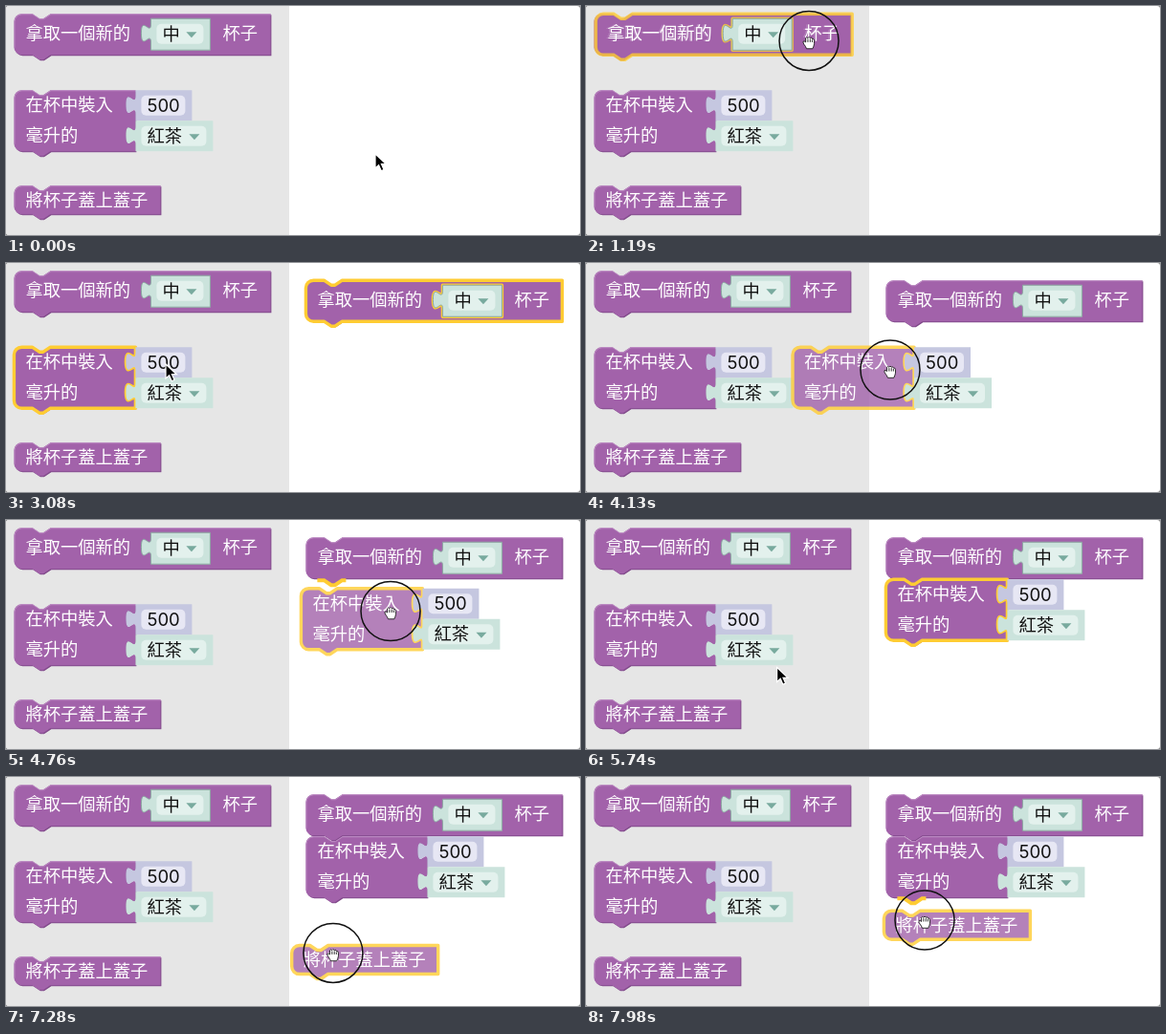
Animation, 600 px wide and 240 px high, one loop 8000 ms. Source, as an HTML page:

```html
<!DOCTYPE html>
<html lang="zh-Hant">
<head>
<meta charset="utf-8">
<style>
html, body { margin: 0; width: 100%; height: 100%; overflow: hidden; background: #888; }
svg { display: block; width: 600px; height: 240px; background: #fff; border-radius: 3px; }
text { font: 500 18.3px "Noto Sans CJK TC", "Noto Sans CJK", sans-serif; fill: #fff; }
.field text { fill: #111; }
.num text { font: 18.5px Inter, "Liberation Sans", sans-serif; }
.body { fill: #a262aa; }
.shade { fill: #80498a; }
.light { fill: none; stroke: #bd8cc3; }
.mint { fill: #cbe3dc; }
.mint rect { fill: #e3f1ed; }
.mint .arrow { fill: #78aa9e; }
.inline .socket { stroke: #8aa7a0; }
.num { fill: #c5c7e0; }
.num rect { fill: #e7e7f4; }
.sel .body { stroke: #fc3; stroke-width: 3.4; stroke-linejoin: round; }
.sel .light, .drag .shade { display: none; }
.drag .body { opacity: .8; }
.link { fill: none; stroke: #fc3; stroke-width: 4; }
</style>
</head>
<body>
<svg id="stage" viewBox="0 0 600 240"></svg>
<script>
const LOOP = 8000, LAG = 40;
const NOTCH = 'l7.5,5 h4 l7.5,-5', TAB_OUT = 'l-7.5,5 h-4 l-7.5,-5';
const SOCKET = 'v6 c0,12.5 -10,-10 -10,9.4 s10,-3.1 10,9.4';

const text = (x, y, s) => `<text x="${x}" y="${y}">${s}</text>`;

// Statement block: right is the path of the right side, hole an inner socket
function statement(top, bottom, right, hole, content) {
  const edge = `a8,8 0 0 1 8,-8 h11 ${NOTCH}`;
  const path = `M9,${top + 8} ${edge} ${right} V${bottom} H47 ${TAB_OUT} H17 a8,8 0 0 1 -8,-8 z ${hole}`;
  return `<path class="shade" fill-rule="evenodd" transform="translate(1 1)" d="${path}"/>
    <path class="body" fill-rule="evenodd" d="${path}"/>
    <path class="light" transform="translate(.5 .5)" d="M9,${bottom - 8} V${top + 8} ${edge} ${right.split(' ')[0]}"/>${content}`;
}

const valuePath = (x, y, right, h) => `M${x},${y} ${SOCKET} V${y + h} H${right} V${y} z`;

function value(cls, x, y, right, h, label) {
  const tip = right - 25;
  const arrow = cls == 'num' ? '' : `<path class="arrow" d="M${tip},${y + 14} h11 l-5.5,6 z"/>`;
  return `<g class="field ${cls}"><path class="socket" d="${valuePath(x, y, right, h)}"/>
    <rect x="${x + 6}" y="${y + 5.5}" width="${right - x - 13}" height="21" rx="5"/>
    ${text(x + 12, y + 22.5, label)}${arrow}</g>`;
}

const shapes = [
  statement(9, 52, 'H277', valuePath(152, 14, 214, 33),
    text(21, 36, '拿取一個新的') + value('mint inline', 152, 14, 214, 33, '中') + text(227, 36, '杯子')),
  statement(89, 153, `H136 ${SOCKET} V121 ${SOCKET}`, '',
    text(21, 111, '在杯中裝入') + text(21, 143, '毫升的') +
    value('num', 136, 89, 195, 32, '500') + value('mint', 136, 121, 217, 32, '紅茶')),
  statement(189, 219, 'H162', '', text(21, 210.5, '將杯子蓋上蓋子'))
];

const link = (id, y) => `<path id="${id}" class="link" d="M326,${y} h7 ${NOTCH} h4"/>`;
const group = prefix => shapes.map((s, i) => `<g id="${prefix}${i}">${s}</g>`).join('');

stage.innerHTML = `<rect width="296" height="240" fill="#e6e6e6"/>
  <g transform="translate(-.6 -.8)">${group('menu')}${group('copy')}${link('link0', 64)}${link('link1', 128)}</g>
  <path id="arrow" d="M0,0 v15 l3.6,-3.3 2.6,6 2.8,-1.2 -2.6,-5.8 h5 z" fill="#000" stroke="#fff" stroke-width="1.2"/>
  <g id="hand" fill="none" stroke="#111"><circle r="31" stroke-width="1.5"/>
    <g transform="translate(0 1.5) scale(.85)">
      <path d="M-3,8 C-4,4 -8,2 -7,-1 Q-6,-2 -4,0 V-5 Q-3,-7 -1.5,-5 Q0,-8 1.5,-5 Q3,-7 4,-4 Q6,-5 6.5,-2 V2 Q6,5 4.5,8 z" fill="#fff"/>
      <path d="M-1.3,-4 V0 M1.5,-4 V0 M4,-3 V0"/></g></g>`;

// Pointer strokes, each eased from wherever the last one ended
const home = [386, 155];
const strokes = [
  { from: 150, to: 850, end: [224, 36] },
  { from: 1120, to: 1780, end: [505, 50] },
  { from: 1850, to: 2200, end: [529, 46] },
  { from: 2400, to: 3000, end: [167, 106] },
  { from: 3150, to: 3450, end: [102, 112] },
  { from: 3680, to: 4150, end: [319, 112] },
  { from: 4200, to: 4720, end: [402, 95.5] },
  { from: 5300, to: 6100, end: [51, 198] },
  { from: 6490, to: 7080, end: [340, 190] },
  { from: 7080, to: 7940, end: [354, 150] }
];

// The pointer holds a block from press to drop; selection lasts until the next press
const drags = [
  { press: 1000, start: 1120, drop: 2300, rest: [305, 10] },
  { press: 3550, start: 3680, drop: 5150, rest: [305, -26] },
  { press: 6350, start: 6490, drop: LOOP, rest: [305, -62] }
];

const ease = u => u * u * (3 - 2 * u);

function pointer(t) {
  return strokes.reduce((p, s) => {
    const u = ease(Math.min(1, Math.max(0, (t - s.from) / (s.to - s.from))));
    return p.map((v, n) => v + (s.end[n] - v) * u);
  }, home);
}

const $ = id => document.getElementById(id);
const show = (id, on) => $(id).style.display = on ? '' : 'none';
const move = (id, p) => $(id).setAttribute('transform', `translate(${p})`);
const within = (t, a, b) => t >= a && t < b;

function draw(t) {
  const at = pointer(t), late = pointer(t - LAG);
  drags.forEach((d, i) => {
    const copy = $('copy' + i), moving = within(t, d.start, d.drop);
    const grab = pointer(d.start), next = drags[i + 1];
    show('copy' + i, t >= d.start);
    move('copy' + i, moving ? late.map((v, n) => v - grab[n]) : d.rest);
    copy.classList.toggle('drag', moving);
    copy.classList.toggle('sel', t < (next ? next.press : LOOP));
    const clicked = i == 1 && within(t, 3000, d.press);
    $('menu' + i).classList.toggle('sel', clicked || within(t, d.press, d.start));
  });
  const held = drags.some(d => within(t, d.press, d.drop));
  show('hand', held);
  show('arrow', !held);
  move('hand', at);
  move('arrow', at);
  show('link0', within(t, 4450, 5150));
  show('link1', t >= 7450);
}

function frame() {
  draw(performance.now() % LOOP);
  requestAnimationFrame(frame);
}
frame();
</script>
</body>
</html>
```
